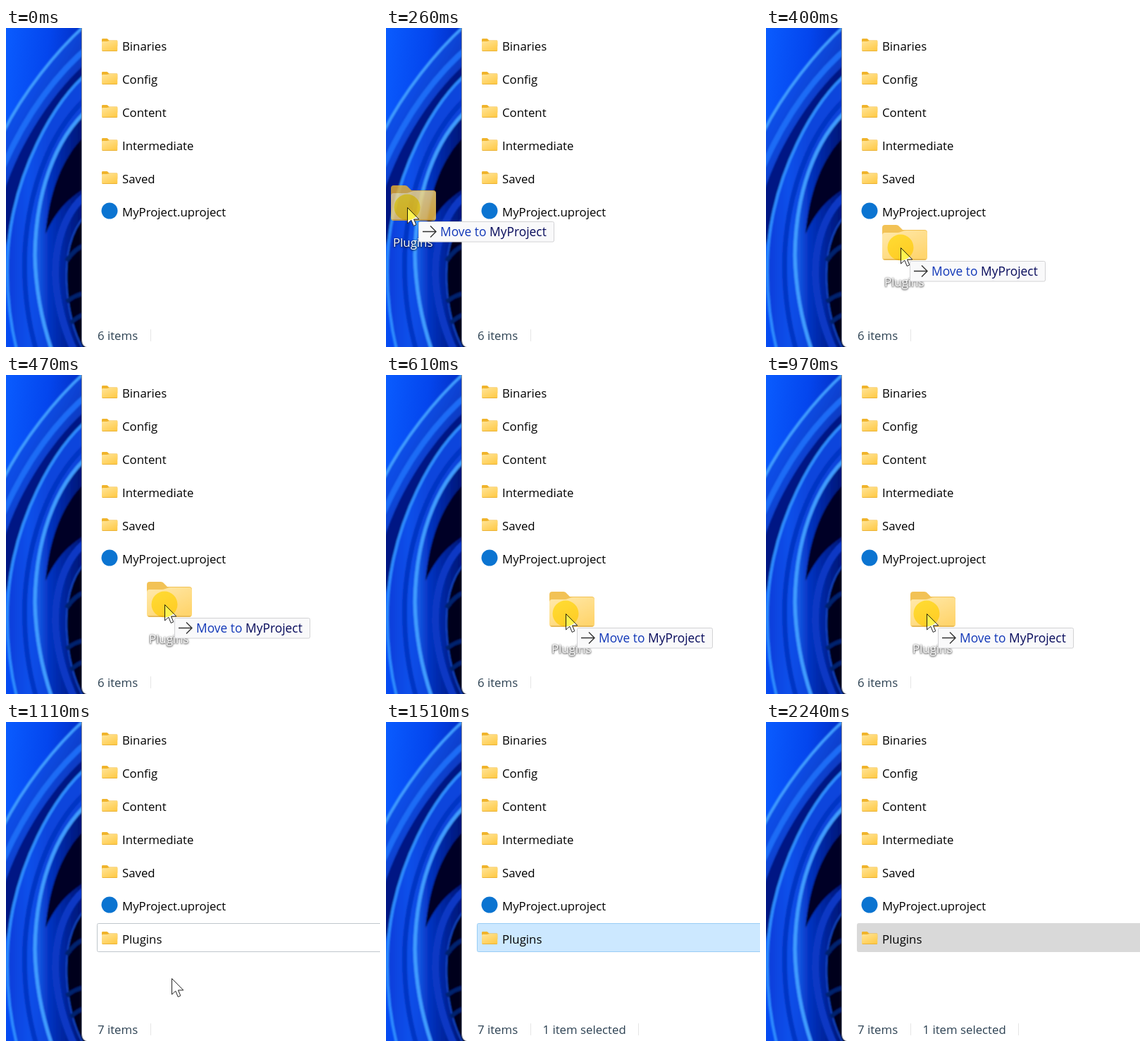
An HTML page for the animation above (2.31 s loop, 531 px wide and 452 px high).

```html
<!DOCTYPE html>
<html lang="en">
<head>
<meta charset="utf-8">
<title>Dropping a folder into a project</title>
<style>
  html, body { margin: 0; width: 100%; height: 100%; overflow: hidden; background: #fff; }
  svg { display: block; width: 531px; height: 452px; }
  text { font: 16.8px "Open Sans", "Noto Sans", sans-serif; fill: #000; white-space: pre; }
  .status text { fill: #2c4152; }
  .status path { stroke: #e6e6e6; }
  .tip text { font-size: 17.4px; fill: #1238b8; }
  .ghost { fill: #fff; filter: drop-shadow(0 1px 1px #0009) drop-shadow(0 0 1px #0008); }
  #halo { mix-blend-mode: multiply; }
</style>
</head>
<body>
<svg viewBox="0 0 531 452">
  <defs>
    <linearGradient id="sky" x2=".9" y2=".35"><stop stop-color="#0a5cff"/><stop offset=".5" stop-color="#0446ee"/><stop offset="1" stop-color="#0228b8"/></linearGradient>
    <linearGradient id="petalA" x2=".7" y2=".9"><stop stop-color="#1a66f4"/><stop offset=".4" stop-color="#0d4ce4"/><stop offset="1" stop-color="#021a86"/></linearGradient>
    <linearGradient id="petalB" x2=".5"><stop stop-color="#0a3cda"/><stop offset=".5" stop-color="#0d50ea"/><stop offset="1" stop-color="#0a44dc"/></linearGradient>
    <linearGradient id="petalC" x2=".8"><stop stop-color="#1c66ee"/><stop offset=".3" stop-color="#0534c4"/><stop offset="1" stop-color="#02187c"/></linearGradient>
    <linearGradient id="front" x2=".7" y2="1"><stop stop-color="#ffe59a"/><stop offset="1" stop-color="#ffcb4a"/></linearGradient>
    <filter id="soft"><feGaussianBlur stdDeviation="1.1"/></filter>
    <symbol id="folder" viewBox="0 0 64 50" preserveAspectRatio="none">
      <path fill="#f0b42c" d="M0 4Q0 0 4 0H20Q23 0 25 3L29 7H60Q64 7 64 11V30H0Z"/>
      <path fill="url(#front)" d="M0 15Q0 11 4 11H21Q24 11 26 10L29 9Q31 8 34 8H60Q64 8 64 12V46Q64 50 60 50H4Q0 50 0 46Z"/>
      <path fill="#e3a92e" d="M1 48H63Q62 50 60 50H4Q2 50 1 48Z"/>
    </symbol>
  </defs>

  <!-- wallpaper -->
  <rect width="120" height="452" fill="url(#sky)"/>
  <g fill="none" filter="url(#soft)">
    <path d="M112 -4C70 34 24 92 -4 148V300L120 120V-4Z" fill="url(#petalA)" stroke="#3f9cff" stroke-width="4"/>
    <path d="M120 24C70 66 28 124 -4 196" stroke="#1f6cf6" stroke-width="8"/>
    <path d="M120 44C70 86 20 160 -4 236V320L30 210L120 76Z" fill="#021884"/>
    <path d="M120 60C66 104 12 206 3 312C-1 370 6 420 16 460H120Z" fill="url(#petalB)" stroke="#2f8cff" stroke-width="4"/>
    <path d="M120 94C70 136 34 214 27 312C24 370 32 420 44 460" stroke="#0634c4" stroke-width="7"/>
    <path d="M120 112C66 158 42 240 41 322C42 376 54 425 66 460H120Z" fill="url(#petalC)" stroke="#3f9cff" stroke-width="5"/>
    <path d="M120 146C84 174 62 226 56 292C72 256 92 238 120 222Z" fill="#010626"/>
    <path d="M120 232C86 254 70 300 70 350C72 394 84 430 98 460" stroke="#0838c4" stroke-width="10"/>
    <path d="M120 258C92 282 84 320 86 362C88 404 98 436 112 460H120Z" fill="#01041c" stroke="#1348cc" stroke-width="2"/>
    <path d="M86 330Q98 312 112 308M86 388Q98 378 112 376M92 418Q102 408 112 406" stroke="#06206e" stroke-width="6"/>
  </g>

  <!-- window -->
  <path d="M540 453H117Q107.5 452 107.5 442V-5H540" fill="#fff" stroke="#858b96"/>
  <rect x="118" y="440" width="420" height="14" fill="#fff"/>
  <rect id="row" x="129.5" y="285.5" width="420" height="40" rx="2"/>
  <g id="list"></g>
  <g class="status">
    <text id="count" x="130" y="442"></text>
    <path d="M205.5 427V444"/>
    <path id="divider" d="M358.5 427V444"/>
    <text id="selected" x="222.5" y="442">1 item selected</text>
  </g>

  <g id="drag">
    <use href="#folder" width="64" height="50" opacity=".8"/>
    <text class="ghost" x="3" y="87">Plugins</text>
    <g class="tip" transform="translate(39 51)">
      <rect x=".5" y=".5" width="192" height="28.5" rx="2" fill="#f9f9fa" stroke="#d2d2d4"/>
      <path d="M6 14.5H25M17 6.5L25 14.5L17 22.5" fill="none" stroke="#333" stroke-width="1.4"/>
      <text x="31" y="21">Move to <tspan fill="#070b5c">MyProject</tspan></text>
    </g>
  </g>
  <path id="pointer" d="M.5 .5V23L5.8 18.2L9.2 26.4L12.8 24.8L9.5 17H16.8Z" fill="#fff" stroke="#222"/>
  <circle id="halo" r="18.5" fill="#fff23c" opacity=".9"/>
</svg>
<script>
const $ = id => document.getElementById(id);
const show = (id, on) => $(id).style.display = on ? '' : 'none';
const place = (id, x, y) => $(id).setAttribute('transform', `translate(${x} ${y})`);

const names = ['Binaries', 'Config', 'Content', 'Intermediate', 'Saved', 'MyProject.uproject', 'Plugins'];
$('list').innerHTML = names.map((name, i) => {
  const icon = name.includes('.')
    ? '<circle cx="147" cy="24" r="11.5" fill="#0b74d1"/>'
    : '<use href="#folder" x="136" y="15" width="22.5" height="18"/>';
  return `<g id="item${i}" transform="translate(0 ${i * 47})">${icon}<text x="165" y="32">${name}</text></g>`;
}).join('');

const LOOP = 2310, ENTER = 260, TURN = 830, DROP = 1110, SELECT = 1180, LABEL = 1510, BLUR = 2240, STEP = 70;
// pointer position at each step of the drag
const path = [[30, 254], [122, 289], [191, 311], [225, 325], [245, 333], [255, 338], [256, 340],
              [251, 341], [243, 340], [234, 339], [228, 338], [230, 348], [235, 363]];

function draw(t) {
  const dragging = t >= ENTER && t < DROP, dropped = t >= DROP;
  show('drag', dragging);
  show('halo', dragging);
  show('pointer', t >= ENTER && t < SELECT);
  show('item6', dropped);
  show('row', dropped);
  show('divider', t >= SELECT);
  show('selected', t >= LABEL);
  $('count').textContent = dropped ? '7 items' : '6 items';

  const [fill, stroke] = t < SELECT ? ['#fff', '#bfc6cc'] : t < BLUR ? ['#cce8ff', '#99cdf5'] : ['#d9d9d9', '#d9d9d9'];
  $('row').setAttribute('fill', fill);
  $('row').setAttribute('stroke', stroke);

  if (t < ENTER || t >= SELECT) return;
  const i = t < TURN ? Math.min(7, Math.floor((t - ENTER) / STEP)) : 8 + Math.floor((t - TURN) / STEP);
  const [x, y] = path[i], [px, py] = path[Math.max(0, i - 1)];
  place('pointer', x, y);
  place('halo', x, y);
  // the dragged folder trails the pointer slightly
  place('drag', Math.round(x - 23 - (x - px) * .045), Math.round(y - 31 - (y - py) * .045));
}

function tick() {
  draw(performance.now() % LOOP);
  requestAnimationFrame(tick);
}
tick();
</script>
</body>
</html>
```
